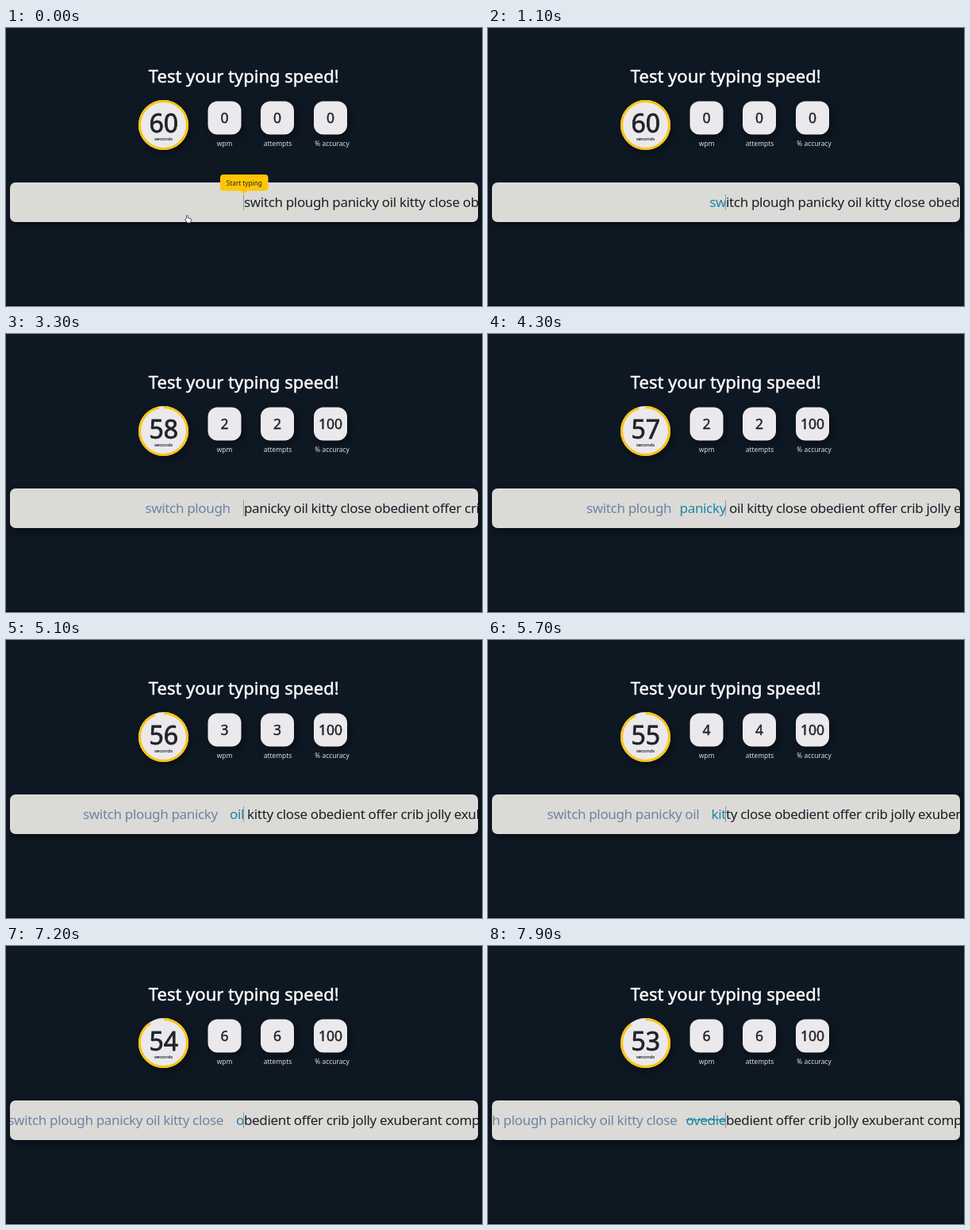
These frames come from a looping animation (600x351 px, 8 s). An HTML page:

```html
<!DOCTYPE html>
<html lang="en">
<head>
<meta charset="utf-8">
<title>Typing speed test</title>
<style>
  html, body { margin: 0; width: 100%; height: 100%; overflow: hidden; background: #0e1823; }
  body { position: relative; font-family: "Noto Sans", "Open Sans", sans-serif; }
  svg { position: absolute; left: 0; top: 0; display: block; }
  svg text { text-anchor: middle; }
  .medium { stroke-width: .45px; }
  .title { font-size: 22px; fill: #fff; stroke: #fff; }
  .seconds { font-size: 32px; fill: #20242b; stroke: #20242b; stroke-width: .8px; }
  .unit { font-size: 6px; fill: #20242b; stroke: #20242b; stroke-width: .15px; }
  .value { font-size: 17.5px; fill: #20242b; stroke: #20242b; }
  .label { font-size: 8.4px; fill: #dcdde0; }
  .hint { font-size: 8.2px; fill: #20242b; }
  .card { fill: #ebe9ec; filter: drop-shadow(3px 4px 5px rgba(0, 0, 0, .4)); }
  .panel {
    position: absolute; left: 5px; top: 195px; width: 590px; height: 50px;
    border-radius: 7px; background: #dbdad6; overflow: hidden;
    font-size: 17px; line-height: 50px; letter-spacing: -.34px; white-space: pre;
  }
  .shade {
    position: absolute; left: 5px; top: 195px; width: 590px; height: 50px;
    border-radius: 7px; box-shadow: 2px 4px 9px rgba(0, 0, 0, .45);
  }
  .before { position: absolute; right: 295px; top: 0; display: flex; }
  .after { position: absolute; left: 295px; top: 0; color: #1a2029; }
  #past { color: #6c83a6; }
  #typed { color: #1b86aa; }
  #typed.wrong { text-decoration: line-through; }
  .caret { position: absolute; left: 294px; top: 15px; width: 1px; height: 20px; background: #96989a; }
</style>
</head>
<body>
<div class="shade"></div>
<div class="panel">
  <div class="before"><span id="past"></span><span id="gap"></span><span id="typed"></span></div>
  <div class="after" id="rest"></div>
  <div class="caret"></div>
</div>
<svg width="600" height="351" viewBox="0 0 600 351">
  <rect y="350" width="600" height="1" fill="#070c13"/>
  <text class="title medium" x="299.7" y="68.5">Test your typing speed!</text>

  <circle class="card" cx="198.5" cy="122.5" r="31.5"/>
  <circle id="ring" cx="198.5" cy="122.5" r="30" fill="none" stroke="#fcc512" stroke-width="3"
    pathLength="60" transform="rotate(-90 198.5 122.5)"/>
  <text class="seconds" id="seconds" x="198.7" y="131.5">60</text>
  <text class="unit" x="198.5" y="141.5">seconds</text>

  <g id="cards"></g>

  <g id="tip">
    <path d="M295 204.500h10l-5 5z" fill="#ffc505"/>
    <rect x="270" y="185" width="60.500" height="20.500" rx="4" fill="#ffc505"/>
    <text class="hint" x="300.3" y="198.500">Start typing</text>
  </g>

  <path id="hand" d="M227.500 240.500v-3q0-1 .9-1t.9 1v2.200l3.200.7q1 .3.900 1.300l-.5 2.800-.8 1.500h-3.600l-2.600-3.700q-.4-1 .6-1.100z"
    fill="#fff" stroke="#222" stroke-width=".8" stroke-linejoin="round"/>
</svg>
<script>
  const LOOP = 8000, START = 620;
  const WORDS = "switch plough panicky oil kitty close obedient offer crib jolly exuberant compare".split(" ");
  // Typed text, time of the first key, time per key, time of the space bar
  const KEYS = [
    ["switch", 640, 270, 2180],
    ["plough", 2310, 152, 3230],
    ["panicky", 3500, 130, 4450],
    ["oil", 4620, 200, 5250],
    ["kitty", 5450, 115, 6200],
    ["close", 6420, 125, 7050],
    ["ovedie", 7180, 132, Infinity]
  ];
  const $ = id => document.getElementById(id);

  const card = (id, cx, label, labelX) => `
    <rect class="card" x="${cx - 21}" y="92.500" width="42" height="42" rx="12"/>
    <text class="value medium" id="${id}" x="${cx}" y="120.3">0</text>
    <text class="label" x="${labelX}" y="149">${label}</text>`;
  $("cards").innerHTML = card("wpm", 275.5, "wpm", 275.5)
    + card("attempts", 342, "attempts", 342.5)
    + card("accuracy", 409, "% accuracy", 411);

  function setText(id, text) {
    const el = $(id);
    if (el.textContent !== String(text)) el.textContent = text;
  }

  function matchLength(a, b) {
    let n = 0;
    while (n < a.length && a[n] === b[n]) n++;
    return n;
  }

  function drawTyping(t) {
    const done = KEYS.filter(key => t >= key[3]).length;
    const [text, first, step] = KEYS[done];
    const count = t < first ? 0 : Math.floor((t - first) / step) + 1;
    const typed = text.slice(0, count);
    const match = matchLength(typed, WORDS[done]);

    setText("past", WORDS.slice(0, done).join(" "));
    setText("typed", typed);
    setText("rest", WORDS.slice(done).join(" ").slice(match));
    $("typed").className = match < typed.length ? "wrong" : "";
    // The space before the current word closes up as the word grows
    $("gap").style.width = done ? 17.3 - .12 * $("typed").offsetWidth + "px" : 0;

    setText("wpm", done);
    setText("attempts", done);
    setText("accuracy", done ? 100 : 0);
  }

  function drawTimer(t) {
    const elapsed = Math.max(0, t - START) / 1000;
    const left = 60 - Math.max(0, elapsed - 1);
    setText("seconds", 60 - Math.floor(elapsed));
    $("ring").setAttribute("stroke-dasharray", `${left} 60`);
  }

  function drawHints(t) {
    const move = Math.min(1, Math.max(0, t - 100) / 400);
    $("tip").style.display = t < KEYS[0][1] ? "" : "none";
    $("hand").style.display = t < START ? "" : "none";
    $("hand").setAttribute("transform", `translate(0 ${45 * move * move * (3 - 2 * move)})`);
  }

  function frame() {
    const t = performance.now() % LOOP;
    drawTyping(t);
    drawTimer(t);
    drawHints(t);
    requestAnimationFrame(frame);
  }
  frame();
</script>
</body>
</html>
```
